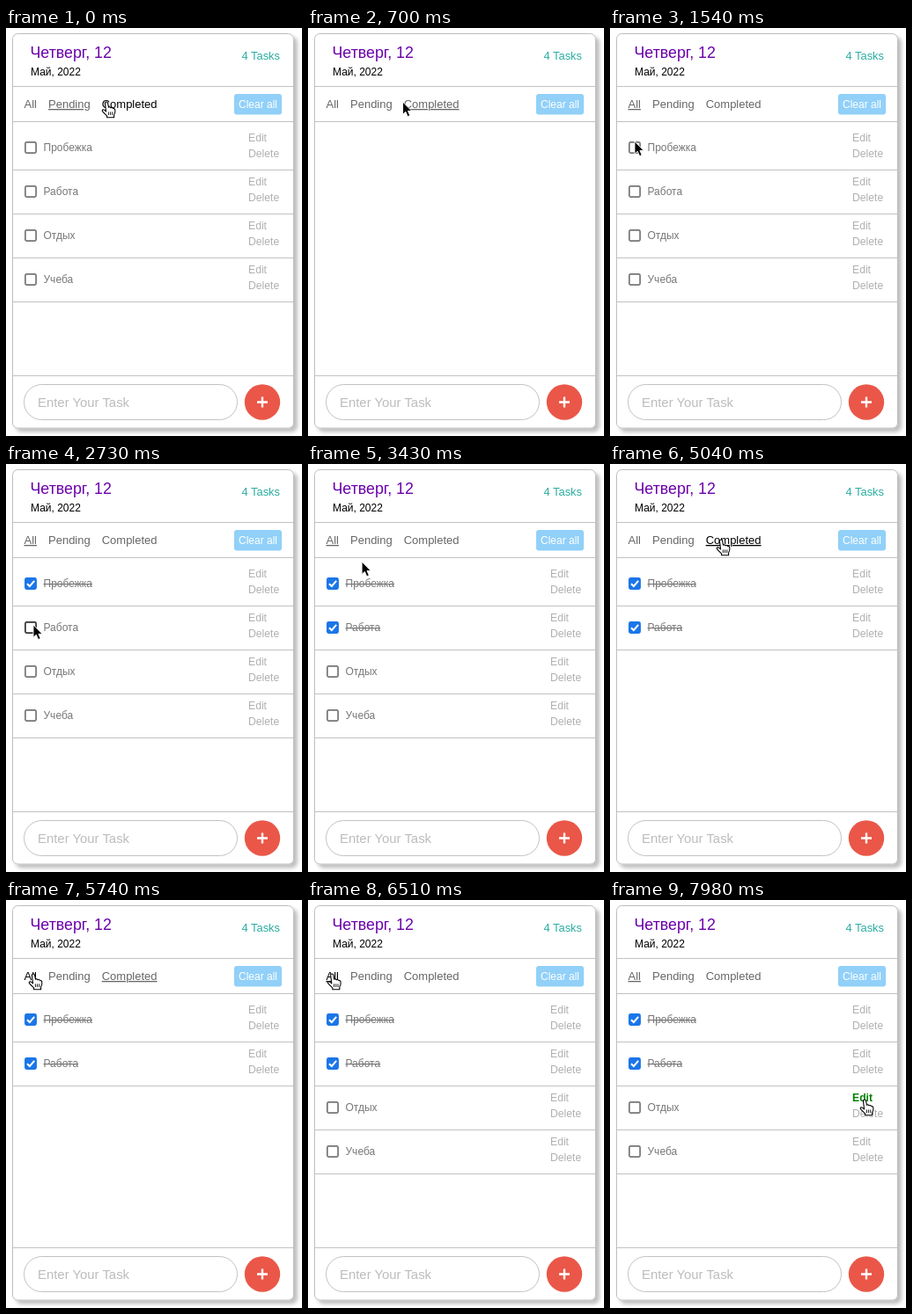
An HTML page for the animation above (8000 ms loop, 336 px wide and 464 px high).

```html
<!DOCTYPE html>
<html lang="ru">
<head>
<meta charset="utf-8">
<title>Task list</title>
<style>
html, body { margin: 0; width: 100%; height: 100%; overflow: hidden; background: #fff; }
svg { display: block; font-family: "Liberation Sans", Arial, sans-serif; }
.line { stroke: #c2c2c2; fill: none; }
.filter { font-size: 13px; fill: #666; }
.filter.active { text-decoration: underline; text-underline-offset: 2px; text-decoration-thickness: 1px; }
.filter.hover { fill: #000; }
.task { font-size: 12px; fill: #777; }
.done .task { text-decoration: line-through; }
.action { font-size: 12.2px; fill: #b0b0b0; }
.action.hover { font-weight: bold; fill: #008000; }
.action.delete.hover { fill: #f00; }
.box { fill: #fff; stroke: #767676; stroke-width: 1.7; }
.box.hover { stroke: #333; }
.done .box { fill: #1b76e8; stroke: #1b76e8; }
.done .box.hover { fill: #125cc0; stroke: #125cc0; }
.tick { fill: none; stroke: #fff; stroke-width: 2; visibility: hidden; }
.done .tick { visibility: inherit; }
</style>
</head>
<body>
<svg id="stage" width="336" height="464" viewBox="0 0 336 464">
  <defs>
    <filter id="shadow" x="-5%" y="-5%" width="112%" height="112%">
      <feDropShadow dx="4" dy="4" stdDeviation="2" flood-opacity=".25"/>
    </filter>
  </defs>
  <rect x="7.5" y="6.5" width="319" height="448.5" rx="6" fill="#fff" stroke="#bdbdbd" filter="url(#shadow)"/>
  <text x="27.5" y="34" font-size="17.8" fill="#6a00ab">Четверг, 12</text>
  <text x="28" y="54" font-size="12" fill="#000">Май, 2022</text>
  <text x="311" y="36" font-size="12.9" fill="#2bada0" text-anchor="end">4 Tasks</text>
  <path class="line" d="M8 66.5H326M8 106.5H326M8 395.5H326"/>
  <rect x="259" y="75" width="54" height="23.5" rx="3" fill="#91d0f8"/>
  <text x="286" y="91" font-size="12" fill="#fff" text-anchor="middle">Clear all</text>
  <g id="filters"></g>
  <g id="rows"></g>
  <rect class="line" x="20.5" y="405.5" width="242" height="40" rx="20"/>
  <text x="36" y="431" font-size="14.9" fill="#bcbcbc">Enter Your Task</text>
  <circle cx="291" cy="425.5" r="20.2" fill="#ea5748"/>
  <path d="M285 425.5h12M291 419.5v12" stroke="#fff" stroke-width="2.4"/>
  <path id="arrow" d="M0 0V14.2L3.3 11.2L5.6 16.6L8.2 15.5L5.9 10.3H10.2Z" fill="#000" stroke="#fff" stroke-width=".9"/>
  <g id="hand" stroke="#000" stroke-linejoin="round">
    <path d="M-1.6 1.4Q-1.4 0 0 0Q1.3 0 1.6 1.4L2.5 6.2Q4 5.2 5 6.8Q6.6 5.8 7.6 7.6Q9.4 7.2 9.8 9.2Q10.4 12.6 8.6 15V17.8H.6V15.8Q-2 13.6-4.6 10.6Q-5 8.6-3.4 8.8Q-1.8 9.4-.4 11Z" fill="#fff" stroke-width="1.1"/>
    <path d="M2.4 11.4v3.6M4.6 11.4v3.6M6.8 11.4v3.6" stroke-width=".9"/>
  </g>
</svg>
<script>
const LOOP = 8000, TICK = 70;
const byId = id => document.getElementById(id);

function add(parent, tag, attrs, text) {
  const node = document.createElementNS("http://www.w3.org/2000/svg", tag);
  for (const key in attrs) node.setAttribute(key, attrs[key]);
  if (text) node.textContent = text;
  return parent.appendChild(node);
}

// Pointer stops: time, x, y of the tip
const path = [
  [0, 114, 84], [630, 114, 84], [1050, 27, 85], [1260, 27, 86], [1540, 28, 129],
  [1680, 28, 135], [2240, 28, 136], [2730, 31, 183], [2870, 30, 186], [3150, 30, 186],
  [3570, 72, 85], [3920, 74, 85], [4200, 107, 85], [4410, 126, 86], [5110, 126, 86],
  [5600, 33, 84], [5740, 31, 84], [6090, 28, 84], [6720, 27, 84], [7490, 287, 225],
  [7630, 289, 227], [8000, 289, 227]
];
const views = [[0, "Pending"], [420, "Completed"], [1190, "All"], [3710, "Pending"], [4620, "Completed"], [6020, "All"]];
const tasks = [["Пробежка", 1960], ["Работа", 3010], ["Отдых", Infinity], ["Учеба", Infinity]];

const filters = [["All", 20.5, 15], ["Pending", 48, 48], ["Completed", 108.7, 64]].map(([name, x, width]) => ({
  name, x, width, node: add(byId("filters"), "text", { x, y: 91, class: "filter" }, name)
}));

const rows = tasks.map(([name, doneAt]) => {
  const node = add(byId("rows"), "g", {});
  const box = add(node, "rect", { x: 21.9, y: 29.9, width: 12.2, height: 12.2, rx: 1.5, class: "box" });
  add(node, "path", { d: "M24 36.2L26.9 39L32.2 32.8", class: "tick" });
  add(node, "text", { x: 42.5, y: 40.3, class: "task" }, name);
  const edit = add(node, "text", { x: 275, y: 29, class: "action edit" }, "Edit");
  const remove = add(node, "text", { x: 275, y: 47, class: "action delete" }, "Delete");
  add(node, "path", { d: "M8 61.5H326", class: "line" });
  return { node, box, edit, remove, doneAt };
});

function pointerAt(t) {
  const i = path.findIndex(stop => stop[0] > t);
  const [t0, x0, y0] = path[i - 1], [t1, x1, y1] = path[i];
  const p = (t - t0) / (t1 - t0), k = p * p * (3 - 2 * p);
  return [x0 + (x1 - x0) * k, y0 + (y1 - y0) * k];
}

function render(t) {
  const [px, py] = pointerAt(t);
  const view = views.filter(v => v[0] <= t).pop()[1];
  let link = false;

  function hover(node, x, y, width, height, isLink) {
    const over = px >= x && px < x + width && py >= y && py < y + height;
    node.classList.toggle("hover", over);
    if (over && isLink) link = true;
  }

  for (const f of filters) {
    f.node.classList.toggle("active", f.name === view);
    hover(f.node, f.x, 78, f.width, 18, true);
  }

  let top = 100;
  for (const row of rows) {
    const done = t >= row.doneAt;
    const shown = view === "All" || done === (view === "Completed");
    row.node.setAttribute("visibility", shown ? "visible" : "hidden");
    if (!shown) continue;
    row.node.setAttribute("transform", `translate(0 ${top})`);
    row.node.classList.toggle("done", done);
    hover(row.box, 21, top + 30, 14, 14, false);
    hover(row.edit, 275, top + 16, 23, 17, true);
    hover(row.remove, 275, top + 34, 36, 17, true);
    top += 50;
  }

  for (const [id, shown] of [["hand", link], ["arrow", !link]]) {
    byId(id).setAttribute("transform", `translate(${px} ${py})`);
    byId(id).setAttribute("visibility", shown ? "visible" : "hidden");
  }
}

const start = performance.now();
function frame() {
  const t = (performance.now() - start) % LOOP;
  render(Math.floor(t / TICK) * TICK);
  requestAnimationFrame(frame);
}
frame();
</script>
</body>
</html>
```
